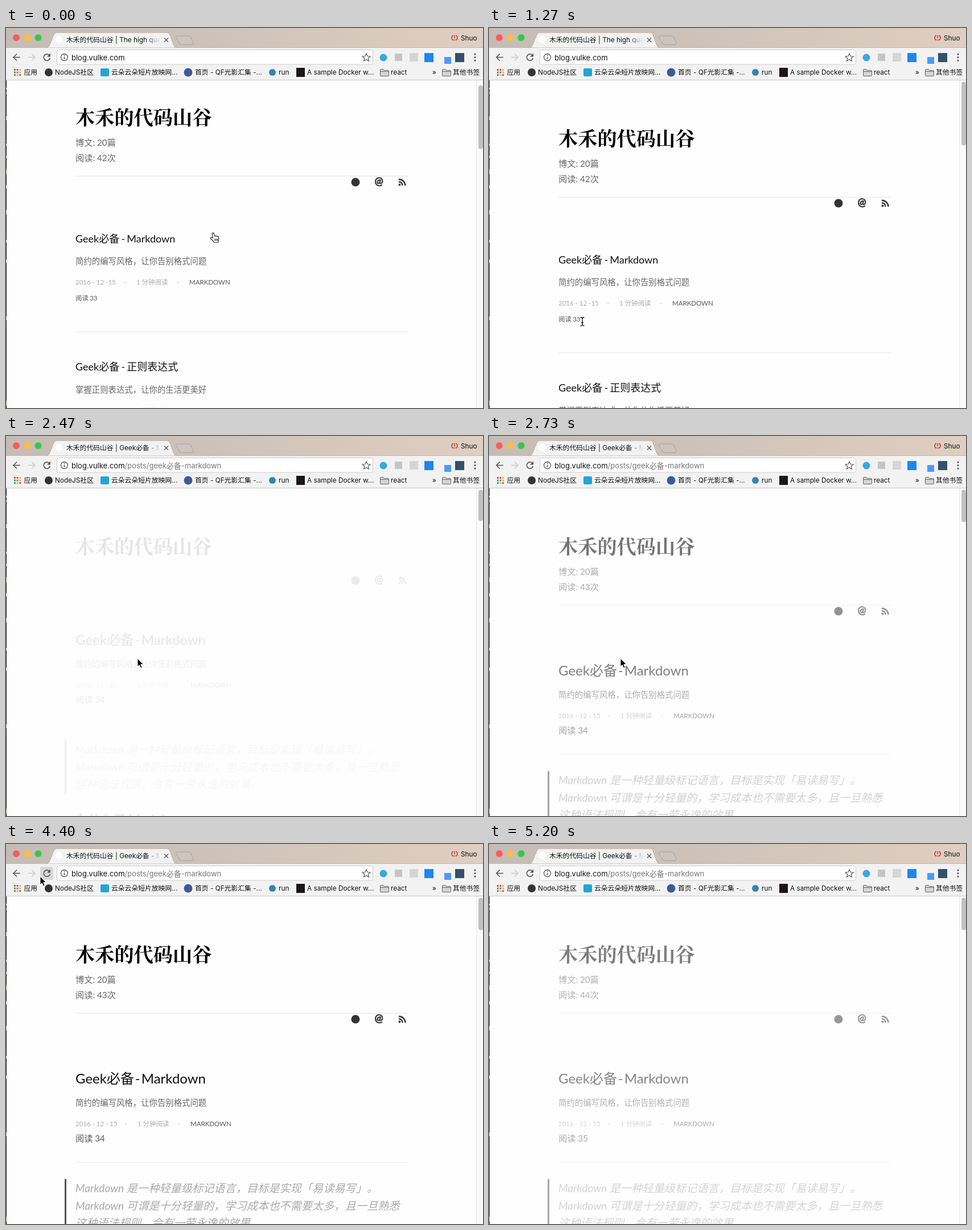
An HTML page that plays this animation: 838x668 px, repeating every 5270 ms.

```html
<!DOCTYPE html>
<html lang="zh-CN">
<head>
<meta charset="utf-8">
<title>Blog reading counter</title>
<style>
html, body { margin: 0; width: 100%; height: 100%; overflow: hidden; background: #fff; }
svg { display: block; }
text { white-space: pre; text-spacing-trim: space-all; }
.ui { font: 11.8px Inter, "Noto Sans CJK SC", sans-serif; fill: #111; }
.url { font-size: 13px; }
.status { font-size: 10.5px; fill: #666; }
.page { font-family: Lato, "Noto Sans CJK SC", sans-serif; font-size: 15.2px; font-weight: 400; fill: #666; }
.site { font: 700 34.2px "Noto Serif CJK SC", "Noto Sans CJK SC", serif; fill: #000; }
.title { font-size: 18px; word-spacing: -1.4px; fill: #111; }
.head { font-size: 24px; word-spacing: -4.2px; fill: #111; }
.desc { font-size: 14.4px; }
.meta { font-size: 11.5px; fill: #aaa; }
.dark { fill: #555; }
.quote { font-size: 19.2px; font-style: italic; fill: #aaa; }
.rule { stroke: #e6e6e6; }
.line { fill: none; stroke: #555; stroke-width: 1.6; }
</style>
</head>
<body>
<svg id="stage" width="838" height="668" viewBox="0 0 838 668">
  <defs>
    <linearGradient id="bar"><stop stop-color="#c5bcb6"/><stop offset=".5" stop-color="#d0c3b9"/><stop offset="1" stop-color="#dfcfc1"/></linearGradient>
    <linearGradient id="fade"><stop stop-color="#f2f2f2" stop-opacity="0"/><stop offset="1" stop-color="#f2f2f2"/></linearGradient>
  </defs>
  <rect width="838" height="668" fill="#fefefe"/>

  <g id="page" class="page">
    <text class="site" x="122" y="207">木禾的代码山谷</text>
    <g id="stats">
      <text x="122" y="244">博文: 20篇</text>
      <text x="122" y="271">阅读: <tspan id="total"></tspan>次</text>
    </g>
    <g id="body">
      <path class="rule" d="M122 297.5H706"/>
      <circle cx="614" cy="308" r="7.5" fill="#333"/>
      <text x="655" y="313" text-anchor="middle" font-size="18" font-weight="700" fill="#333" stroke="#333" stroke-width=".6">@</text>
      <g fill="none" stroke="#333" stroke-width="2.4">
        <path d="M690 307.5a6 6 0 0 1 6.500 6.500M690 303a11 11 0 0 1 11.500 11"/>
        <circle cx="691.500" cy="312.500" r="1" stroke-width="2"/>
      </g>
      <g id="list">
        <text class="title" x="122" y="414">Geek必备 - Markdown</text>
        <path id="arrow" d="M305 408h12m-4-4l4 4l-4 4" fill="none" stroke="#999"/>
        <text class="desc" x="122" y="452">简约的编写风格，让你告别格式问题</text>
        <g class="meta">
          <text x="122" y="488">2016 - 12 -15</text><text x="207" y="488">-</text>
          <text x="229" y="488">1 分钟阅读</text><text x="300" y="488">-</text>
          <text x="322" y="488" class="dark">MARKDOWN</text>
          <text x="122" y="516" class="dark">阅读</text>
          <rect id="mark" x="147" y="504" width="14" height="15" fill="#333"/>
          <text id="count" x="147.200" y="516">33</text>
        </g>
        <path class="rule" d="M122 571H706"/>
        <text class="title" x="122" y="639">Geek必备 - 正则表达式</text>
        <text class="desc" x="122" y="678">掌握正则表达式，让你的生活更美好</text>
        <text class="meta" x="229" y="714">1 分钟阅读</text>
      </g>
      <g id="post">
        <text class="head" x="122" y="421">Geek必备 - Markdown</text>
        <text class="desc" x="122" y="460">简约的编写风格，让你告别格式问题</text>
        <g class="meta">
          <text x="122" y="496">2016 - 12 - 15</text><text x="209" y="496">-</text>
          <text x="231" y="496">1 分钟阅读</text><text x="302" y="496">-</text>
          <text x="324" y="496" class="dark">MARKDOWN</text>
        </g>
        <text class="dark" x="122" y="523">阅读 <tspan id="reads"></tspan></text>
        <path class="rule" d="M122 559.500H706"/>
        <rect x="103" y="589" width="3" height="95" fill="#555"/>
        <g class="quote">
          <text x="122" y="612">Markdown 是一种轻量级标记语言，目标是实现「易读易写」。</text>
          <text x="122" y="642.500">Markdown 可谓是十分轻量的，学习成本也不需要太多，且一旦熟悉</text>
          <text x="122" y="673">这种语法规则，会有一劳永逸的效果。</text>
        </g>
        <text x="122" y="736" font-size="22" font-weight="700" fill="#222">为什么用 Markdown</text>
      </g>
    </g>
  </g>

  <g id="scroll">
    <rect x="827" y="92" width="11" height="576" fill="#fafafa"/>
    <path d="M826.500 92V668" stroke="#e8e8e8"/>
    <rect id="thumb" x="830" width="8" rx="4" fill="#c1c1c1"/>
  </g>
  <path d="M.5 92V668" stroke="#111"/>
  <path d="M.5 105v3m0 5v2m0 40v7m0 41v4m0 18v3m0 48v6m0 38v8m0 44v5m0 30v6m0 94v7" stroke="#aaa"/>
  <path d="M.5 248v9M.5 655v8" stroke="#4b4"/>

  <g id="status" class="ui">
    <path d="M-1 652.500H278q3 0 3 3V669H-1Z" fill="#f1f1f1" stroke="#c6c6c6"/>
    <text class="status" x="5" y="664">blog.vulke.com/posts/geek必备-markdown</text>
  </g>

  <g class="ui">
    <rect width="838" height="35" fill="url(#bar)"/>
    <path d="M0 34.500H838" stroke="#c2b8b0"/>
    <circle cx="18" cy="17" r="6" fill="#fc5b57"/>
    <circle cx="37.500" cy="17" r="6" fill="#fdbc40"/>
    <circle cx="56.500" cy="17" r="6" fill="#34c84a"/>
    <path d="M299 17q-1-3 2-3h20q3 0 4 3l4 9q1 3-2 3h-19q-3 0-4-3Z" fill="#cbc5c0" stroke="#a8a09a"/>
    <path d="M70 35q4 0 6-4l8-19q2-4 5-4H283q4 0 5 4l7 19q2 4 6 4Z" fill="#f2f2f2" stroke="#b3aaa4"/>
    <circle cx="93" cy="20.500" r="6.500" fill="#fff"/>
    <svg x="106" y="9" width="165" height="25">
      <text id="tab" y="16"></text>
      <rect x="138" width="27" height="25" fill="url(#fade)"/>
    </svg>
    <path d="M278 17.500l7 7m0-7l-7 7" stroke="#555" stroke-width="1.300"/>
    <path d="M786 13a4.500 4.500 0 0 0 0 8.500M790 13a4.500 4.500 0 0 1 0 8.500M788 13v5m0 2v2" fill="none" stroke="#d33a2f" stroke-width="1.500"/>
    <text x="799" y="22">Shuo</text>

    <rect y="35" width="838" height="57" fill="#f2f2f2"/>
    <path d="M0 91.500H838" stroke="#c9c9c9"/>
    <rect id="hover" x="60" y="40" width="23" height="23" rx="2" fill="#d8d8d8"/>
    <path class="line" d="M25 51.500H13m6-6l-6 6l6 6"/>
    <path class="line" d="M39 51.500h12m-6-6l6 6l-6 6" style="stroke:#ccc"/>
    <path class="line" d="M76 47.500a5.700 5.700 0 1 0 1.500 5.500"/>
    <path d="M78 44.500v6h-6Z" fill="#555"/>
    <rect x="89.500" y="38.500" width="555" height="25.500" rx="3" fill="#fff" stroke="#ccc"/>
    <circle cx="102.500" cy="51.500" r="6" class="line" style="stroke-width:1.300"/>
    <path d="M102.500 50.500v4.500m0-7.500v1.500" stroke="#555" stroke-width="1.500"/>
    <text class="url" x="115" y="56.500">blog.vulke.com<tspan id="path" fill="#777"></tspan></text>
    <path d="M633 45l2 4.500l5 .5l-3.800 3.300l1.200 4.800l-4.400-2.600l-4.400 2.600l1.200-4.800l-3.800-3.300l5-.5Z" class="line" style="stroke-width:1.200"/>
    <circle cx="663" cy="52" r="6.500" fill="#35a8e8"/>
    <rect x="683" y="45" width="13" height="13" fill="#c5c5c5"/>
    <rect x="709" y="44" width="15" height="15" fill="#d5d5d5"/>
    <rect x="735" y="44" width="16" height="16" fill="#1c86f2"/>
    <rect x="770" y="51" width="12" height="12" fill="#4d9af5"/>
    <rect x="789" y="44" width="16" height="16" fill="#35506d"/>
    <path d="M824 46v.1m0 5.400v.1m0 5.400v.1" stroke="#555" stroke-width="3.200" stroke-linecap="round"/>

    <g id="apps"></g>
    <text x="31.500" y="82">应用</text>
    <circle cx="75" cy="78" r="7" fill="#333"/>
    <text x="86" y="82">NodeJS社区</text>
    <rect x="166" y="71" width="15" height="14" rx="2" fill="#20a5dc"/>
    <text x="185" y="82">云朵云朵短片放映网...</text>
    <circle cx="320" cy="78" r="7.500" fill="#3c5a9c"/>
    <text x="332" y="82">首页 - QF光影汇集 -...</text>
    <circle cx="468" cy="78" r="6" fill="#2f86b5"/>
    <text x="479" y="82">run</text>
    <rect x="510" y="70" width="15" height="16" fill="#1d1414"/>
    <text x="529" y="82">A sample Docker w...</text>
    <g fill="#d5d5d5" stroke="#666">
      <path id="folder" d="M657.500 83V74q0-1.500 1.500-1.500h4l1.500 2H671q1.500 0 1.500 1.500v7q0 1.500-1.500 1.500H659q-1.500 0-1.500-1.500ZM658 76.500h14"/>
      <use href="#folder" x="109"/>
    </g>
    <text x="676" y="82">react</text>
    <text x="749" y="82">»</text>
    <text x="785" y="82">其他书签</text>
  </g>

  <g id="cursor" stroke="#fff" stroke-linejoin="round">
    <path id="pointer" d="M0 0V14.500L3.300 11.500L5.700 17L8.200 16L5.800 10.500H10.300Z" fill="#000"/>
    <path id="hand" d="M-2 1.500Q-1-1 1 .8L2.500 6Q4 4.500 5 6Q6.500 5 7.500 6.500Q9.500 6 9.500 8.500V12Q9.500 14 8.500 17H1.500Q0 14-2 12.500L-4.500 10Q-5 7.500-2.500 8L-.5 9ZM3 10.500v3.500m2.300-3.500v3.500m2.200-3.500v3.500" fill="#fff" stroke="#222" stroke-width="1.200"/>
    <g id="beam" fill="none">
      <path d="M-3.500-7.500q3.500 0 3.500 2.500q0-2.500 3.500-2.500M0-5V5M-3.500 7.500q3.500 0 3.500-2.500q0 2.500 3.500 2.500M-2 2H2" stroke-width="3"/>
      <path d="M-3.500-7.500q3.500 0 3.500 2.500q0-2.500 3.500-2.500M0-5V5M-3.500 7.500q3.500 0 3.500-2.500q0 2.500 3.500 2.500M-2 2H2" stroke="#111" stroke-width="1.300"/>
    </g>
  </g>
</svg>
<script>
const LOOP = 5270, OPEN = 2130, RELOAD = 4670, FADE = 600, STATS_DELAY = 190;
const $ = id => document.getElementById(id);
const show = (id, on) => $(id).setAttribute('display', on ? 'inline' : 'none');
const move = (id, x, y) => $(id).setAttribute('transform', `translate(${x} ${y})`);
const write = (id, s) => { if ($(id).textContent !== String(s)) $(id).textContent = s; };
const clamp = v => Math.max(0, Math.min(1, v));
const ease = v => v * v * (3 - 2 * v);

// time, x, y, shape until the next stop
const stops = [
  [0, 364, 360, 'hand'], [130, 364, 360, 'pointer'], [530, 179, 498, 'pointer'],
  [1130, 179, 498, 'pointer'], [1270, 164, 516, 'beam'], [1400, 156, 519, 'beam'],
  [1670, 156, 519, 'pointer'], [1870, 227, 400, 'hand'], [2200, 227, 400, 'pointer'],
  [2400, 231, 391, 'pointer'], [2730, 231, 391, 'pointer'], [3100, 245, 321, 'pointer'],
  [3200, 245, 321, 'pointer'], [3390, 161, 519, 'beam'], [3800, 161, 519, 'pointer'],
  [4270, 60, 73, 'pointer'], [4390, 60, 57, 'pointer'], [4870, 60, 57, '']
];

const dots = ['#e04a3f', '#e04a3f', '#f2b32c', '#3c9f55', '#4a86e0', '#f2b32c', '#3c9f55', '#f2b32c', '#e04a3f'];
$('apps').innerHTML = dots.map((c, i) =>
  `<rect x="${14 + i % 3 * 4.6}" y="${72 + (i / 3 | 0) * 4.6}" width="3" height="3" fill="${c}"/>`).join('');

function drawCursor(t) {
  const i = stops.findLastIndex(s => s[0] <= t);
  const a = stops[i], b = stops[i + 1] || a;
  const k = ease(clamp((t - a[0]) / (b[0] - a[0] || 1)));
  move('cursor', a[1] + (b[1] - a[1]) * k, a[2] + (b[2] - a[2]) * k);
  for (const shape of ['pointer', 'hand', 'beam']) show(shape, shape === a[3]);
}

function draw(t) {
  const post = t >= OPEN, again = t >= RELOAD;
  const born = again ? 4900 : 2410;
  const blank = post && t < born;
  const loaded = !post || t >= born + STATS_DELAY;
  const scroll = 37 * (1 - ease(clamp((t - 70) / 400)));
  const selected = t >= 1470;

  show('page', !blank);
  show('scroll', !blank);
  show('list', !post);
  show('post', post);
  show('stats', loaded);
  $('page').setAttribute('opacity', post ? clamp((t - born) / FADE) : 1);
  move('page', 0, -scroll);
  move('body', 0, loaded ? 0 : -54);
  $('thumb').setAttribute('y', 94.500 + scroll / 6);
  $('thumb').setAttribute('height', !post ? 112 : loaded ? 57 : 55);

  write('total', 42 + post + again);
  write('reads', 33 + post + again);
  write('tab', '木禾的代码山谷 | ' + (post ? 'Geek必备 - Markdown' : 'The high quality'));
  write('path', post ? '/posts/geek必备-markdown' : '');

  show('mark', selected);
  $('count').setAttribute('fill', selected ? '#fff' : '#555');
  show('arrow', t >= 1820);
  show('status', t >= 1820 && t < 2270);
  show('hover', t >= 4330 && t < 4870);
  drawCursor(t);
}

function tick() {
  draw(performance.now() % LOOP);
  requestAnimationFrame(tick);
}
tick();
</script>
</body>
</html>
```
